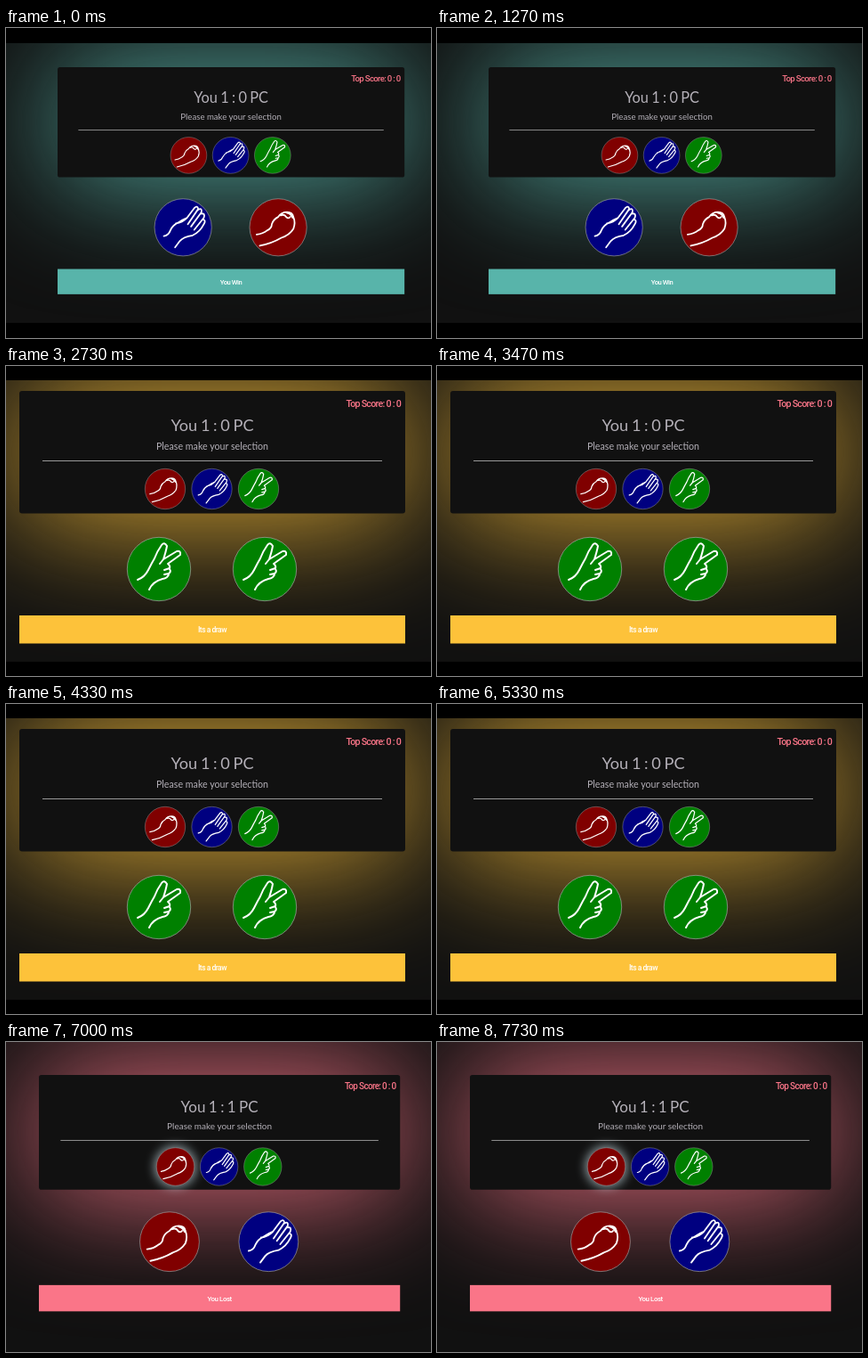
An HTML page for the animation above (8190 ms loop, 478x348 px).

```html
<!DOCTYPE html>
<html lang="en">
<head>
<meta charset="utf-8">
<title>Rock paper scissors</title>
<style>
  html, body { margin: 0; width: 100%; height: 100%; overflow: hidden; background: #111; }
  svg { display: block; width: 478px; height: 348px; }
  .scene { visibility: hidden; }
  .scene.on { visibility: visible; }
  .halo { filter: blur(75px); }
  .glow { filter: blur(6px); fill: #c4d8df; opacity: .7; }
  .disc { stroke: #a5a5a5; stroke-width: .7; }
  .hand { fill: none; stroke: #fff; stroke-width: 2; stroke-linecap: round; stroke-linejoin: round; }
  text { text-anchor: middle; fill: #b4b0b8; font-family: Lato, sans-serif; }
  .title { font-size: 18.2px; word-spacing: -1px; }
  .hint { font-size: 10.7px; }
  .score, .result { font-family: Roboto, sans-serif; font-weight: 500; }
  .score { font-size: 10.7px; letter-spacing: -.75px; text-anchor: end; fill: #fa7588; }
  .result { font-size: 8.5px; letter-spacing: -.5px; fill: #fff; }
</style>
</head>
<body>
<svg id="stage" viewBox="0 0 478 348"></svg>
<script>
const LOOP = 8190;

// Hands are drawn around the centre of a disc of radius 36.
const hands = {
  rock: {
    color: '#800000',
    path: 'M-27 9Q-19 8 -14 4Q-8 1 -8 -4Q-6 -10 0 -13Q4 -19 11 -19Q18 -19 19 -13Q22 -6 19 2Q14 10 4 13Q-8 20 -23 23' +
          'M3 -15Q8 -17 10 -13Q13 -10 15 -13M11 -18Q16 -17 18 -12'
  },
  paper: {
    color: '#000080',
    path: 'M-24 11Q-18 10 -16 4Q-13 -3 -6 -6Q0 -10 5 -12L14 -24Q18 -28 19 -23L6 -4' +
          'M19 -22Q24 -25 23 -19L10 -1M23 -17Q28 -18 26 -12L14 3M25 -10Q29 -9 26 -4Q21 6 12 10Q0 12 -4 17L-10 25' +
          'M5 -12Q-1 -6 -9 -5'
  },
  scissors: {
    color: '#008000',
    path: 'M-24 12Q-16 9 -12 1Q-8 -7 -5 -12Q-2 -20 3 -27Q6 -31 9 -26Q8 -20 5 -11L20 -20Q25 -21 24 -16L10 -6' +
          'Q13 -4 12 -1L6 1M12 0Q14 3 11 5L6 6M11 6Q10 10 4 11Q-7 14 -11 23M5 -11L1 -6'
  }
};

const scenes = [
  { start: 0, x: 58, y: 44, scale: .899, color: '#58b4aa', pc: 0, you: 'paper', foe: 'rock', result: 'You Win', bars: [17, 331] },
  { start: 2730, x: 15, y: 28, scale: 1, color: '#fdc23a', pc: 0, you: 'scissors', foe: 'scissors', result: 'Its a draw', bars: [16, 332] },
  { start: 5470, x: 37, y: 37, scale: .936, color: '#fa7588', pc: 1, you: 'rock', foe: 'paper', result: 'You Lost', glow: true }
];

function disc(name, x, y, scale = 1) {
  const { color, path } = hands[name];
  return `<g transform="translate(${x} ${y}) scale(${scale})">
    <circle class="disc" r="35.7" fill="${color}"/><path class="hand" d="${path}"/></g>`;
}

function draw(s) {
  const bars = s.bars
    ? `<path d="M0 0H478V${s.bars[0]}H0ZM0 ${s.bars[1]}H478V348H0Z"/>` : '';
  const glow = s.glow ? '<circle class="glow" cx="164" cy="110" r="25"/>' : '';
  const choices = Object.keys(hands).map((name, i) => disc(name, 164 + 52.5 * i, 110, .635)).join('');
  return `<g class="scene">
    <rect width="478" height="348" fill="#111"/>
    <g transform="translate(${s.x} ${s.y}) scale(${s.scale})">
      <rect class="halo" width="434" height="137" fill="${s.color}"/>
      <rect width="434" height="137.5" rx="3" fill="#111"/>
      <text class="score" x="429" y="17.5">Top Score: 0 : 0</text>
      <text class="title" x="217" y="44.5">You 1 : ${s.pc} PC</text>
      <text class="hint" x="217" y="65.5">Please make your selection</text>
      <path d="M26 78.5H408" stroke="#999"/>
      ${glow}${choices}
      ${disc(s.you, 157, 200)}${disc(s.foe, 276, 200)}
      <rect y="252" width="434" height="31.5" fill="${s.color}"/>
      <text class="result" x="217" y="271">${s.result}</text>
    </g>${bars}</g>`;
}

const stage = document.getElementById('stage');
stage.innerHTML = scenes.map(draw).join('');
const groups = [...stage.children];

function frame() {
  const t = performance.now() % LOOP;
  const current = scenes.findLastIndex(s => t >= s.start);
  groups.forEach((g, i) => g.classList.toggle('on', i === current));
  requestAnimationFrame(frame);
}
frame();
</script>
</body>
</html>
```
